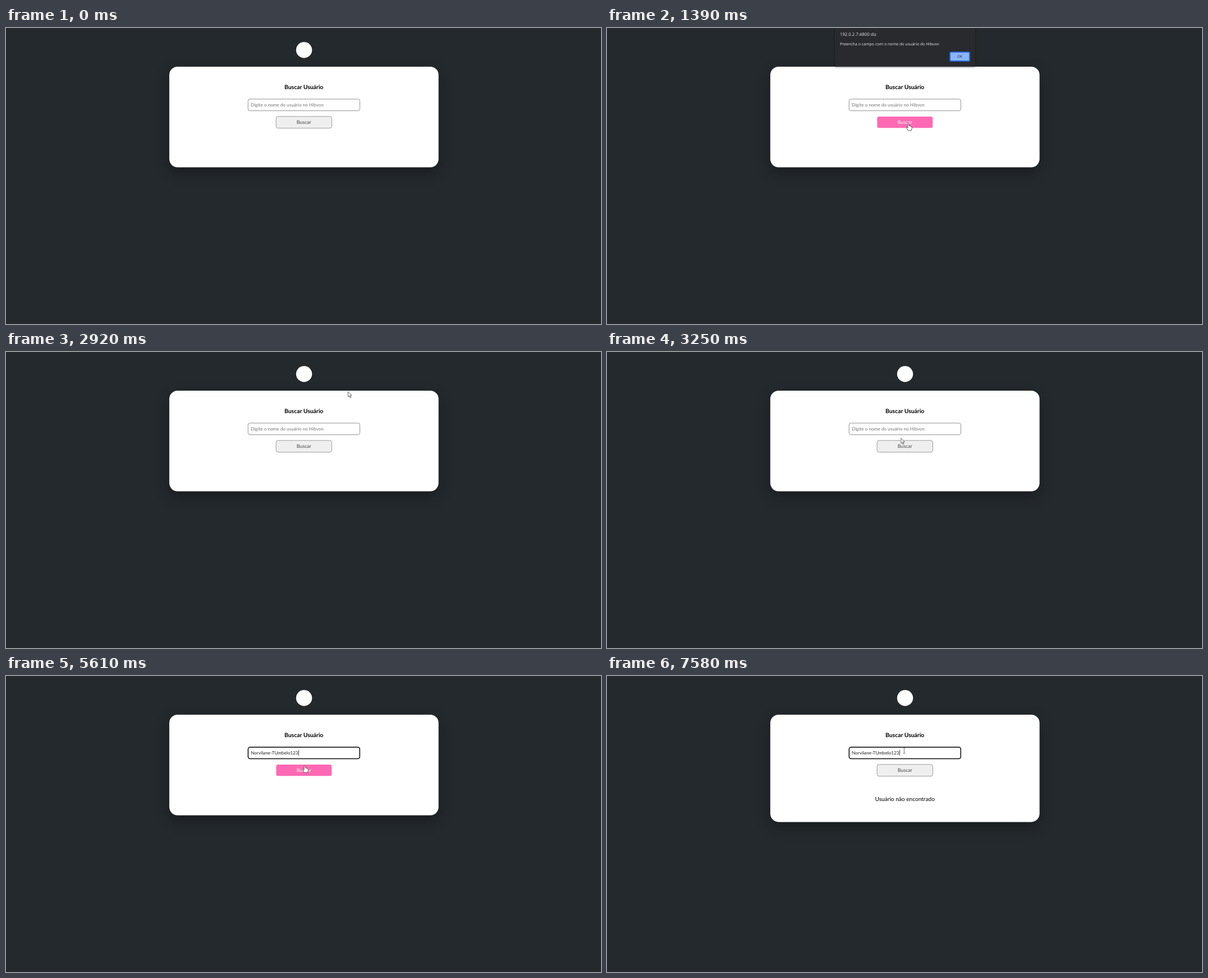
Write an HTML page that moves like this. It is 1060x528 px and loops after 8 s.

```html
<!DOCTYPE html>
<html lang="pt-BR">
<head>
<meta charset="utf-8">
<title>Buscar Usuário</title>
<style>
html, body { margin: 0; width: 100%; height: 100%; overflow: hidden; }
body {
  position: relative;
  background: #24292d;
  font: 8.2px/22px Lato, sans-serif;
  text-rendering: geometricPrecision;
  white-space: nowrap;
}
div, svg { position: absolute; box-sizing: border-box; }

/* Every animated part shares one 8 s clock and changes in hard steps. */
.a, .typo::after { animation: 8s step-end infinite; }

.shapes { left: 0; top: 0; width: 1060px; height: 528px; }
.card {
  fill: #fff;
  filter: drop-shadow(0 9px 11px rgba(0,0,0,.3));
  animation-name: grow;
}
.input { fill: #fff; stroke: #767676; stroke-width: .8; }
.ring { fill: none; stroke: #101010; stroke-width: 1.5; animation-name: ring; }
.button { fill: #efefef; stroke: #767676; stroke-width: .7; }
.hot { animation-name: hot; }

.line { left: 290.7px; width: 480px; text-align: center; color: #000; }
.title { top: 95px; font-size: 10.4px; font-weight: 700; }
.result { top: 209px; font-size: 10.15px; animation-name: result; }
.label { top: 157px; font-size: 8.75px; animation-name: label; }

.hint, .value { left: 436px; top: 126px; height: 22px; }
.hint { color: #757575; animation-name: hint; }
.value { color: #222; }
.name { animation-name: name; }
.d1 { animation-name: d1; }
.d2 { animation-name: d2; }
.d3 { animation-name: d3; }
.typo { position: relative; }
.typo::after {
  content: ""; position: absolute; left: 1px; right: 0; bottom: 0;
  border-bottom: 1px dotted #df7878; animation-name: typo;
}
.caret {
  display: inline-block; width: 1px; height: 10px; margin-right: -1px;
  vertical-align: -2px; background: #444; animation-name: caret;
}

.dialog {
  left: 406px; top: 0; width: 250px; height: 69px;
  background: #292a2d; color: #e8eaed; font-family: "Open Sans", sans-serif;
  box-shadow: 0 1px 3px rgba(0,0,0,.45); animation-name: dialog;
}
.host { left: 9px; top: 1px; font-size: 7.75px; }
.msg { left: 9px; top: 18px; font-size: 7.05px; }
.ok {
  left: 204px; top: 42px; width: 37px; height: 18px; line-height: 14px;
  border: 2px solid #2a68d4; border-radius: 3px; background: #8ab4f8; color: #202124;
  font-size: 6.4px; text-align: center; animation-name: ok;
}

.cursor { left: 0; top: 0; width: 1px; height: 1px; overflow: visible; animation-name: move; }
.cursor path { fill: #fff; stroke: #333; stroke-width: .8; stroke-linejoin: round; }
.arrow { animation-name: arrow; }
.hand { animation-name: hand; }
.beam { animation-name: beam; }

@keyframes grow { 0% { height: 179.7px } 76.44%, to { height: 191.6px } }
@keyframes result { 0% { opacity: 0 } 76.44%, to { opacity: 1 } }
@keyframes ring { 0%, 74.75% { opacity: 0 } 44%, 94%, to { opacity: 1 } }
@keyframes caret { 0%, 50.625%, 74.75% { opacity: 0 } 44%, 56.5%, 94%, to { opacity: 1 } }
@keyframes hint { 0% { opacity: 1 } 56.5%, to { opacity: 0 } }
@keyframes name { 0% { font-size: 0 } 56.5%, to { font-size: 8.2px } }
@keyframes d1 { 0% { font-size: 0 } 64%, to { font-size: 8.2px } }
@keyframes d2 { 0% { font-size: 0 } 65.625%, to { font-size: 8.2px } }
@keyframes d3 { 0% { font-size: 0 } 66.625%, to { font-size: 8.2px } }
@keyframes typo { 0%, 64%, to { opacity: 0 } 57.25% { opacity: 1 } }
@keyframes hot { 0%, 35.625%, 90.6%, to { opacity: 0 } 13.28%, 69.8% { opacity: 1 } }
@keyframes label { 0%, 35.625%, 90.6%, to { color: #444 } 13.28%, 69.8% { color: #fff } }
@keyframes dialog { 0%, 34.75%, to { opacity: 0 } 16.625% { opacity: 1 } }
@keyframes ok { 0% { background: #8ab4f8 } 29.78%, to { background: #84a8e6 } }
@keyframes arrow { 0%, 13.28%, 41.375%, 69.8%, to { opacity: 0 } 4.875%, 24%, 68.95% { opacity: 1 } }
@keyframes hand { 0%, 24%, 90.6%, to { opacity: 0 } 13.28%, 69.8% { opacity: 1 } }
@keyframes beam { 0%, 68.95% { opacity: 0 } 41.375%, 90.6%, to { opacity: 1 } }
@keyframes move {
  0% { translate: 985px 488px }
  4.875% { translate: 985px 488px; animation-timing-function: steps(3, end) }
  7.375% { translate: 709px 313px }
  9.125% { translate: 709px 313px; animation-timing-function: steps(6, start) }
  14.125% { translate: 537px 170px }
  24% { translate: 537px 170px; animation-timing-function: steps(6, start) }
  29% { translate: 630px 22px; animation-timing-function: steps(3, start) }
  31.375% { translate: 626.5px 54px }
  35.625% { translate: 626.5px 54px; animation-timing-function: steps(6, start) }
  41.3% { translate: 523.5px 153.5px }
  41.375% { translate: 528.5px 137px }
  68.125% { translate: 528.5px 137px; animation-timing-function: steps(5, start) }
  72.3% { translate: 534.5px 174.5px }
  89.75% { translate: 534.5px 174.5px; animation-timing-function: steps(3, start) }
  92.35%, to { translate: 529.5px 133px }
}
</style>
</head>
<body>
<svg class="shapes">
  <circle cx="531" cy="39.3" r="14.2" fill="#fff"/>
  <rect class="card a" x="290.9" y="68.9" width="479.7" height="179.7" rx="15"/>
  <rect class="input" x="431.2" y="126.8" width="199.2" height="20.8" rx="3.5"/>
  <rect class="ring a" x="431.4" y="126.9" width="198.8" height="20.6" rx="3.5"/>
  <rect class="button" x="481.1" y="157.8" width="99.3" height="20.9" rx="3.5"/>
  <g class="hot a">
    <rect x="480" y="156" width="102" height="24" fill="#fff"/>
    <rect x="481.3" y="158" width="98.9" height="20.3" rx="3" fill="#ff69b4"/>
  </g>
</svg>
<div class="line title">Buscar Usuário</div>
<div class="hint a">Digite o nome do usuário no Hibvon</div>
<div class="value"><span class="name a">Norvilane-<span class="typo">TUmbelo</span></span><span class="d1 a">1</span><span class="d2 a">2</span><span class="d3 a">3</span><span class="caret a"></span></div>
<div class="line label a">Buscar</div>
<div class="line result a">Usuário não encontrado</div>
<div class="dialog a">
  <div class="host">192.0.2.7:4800 diz</div>
  <div class="msg">Preencha o campo com o nome do usuário do Hibvon</div>
  <div class="ok a">OK</div>
</div>
<svg class="cursor a">
  <path class="arrow a" d="M0 0V9.5L2.2 7.5 3.7 11 5.2 10.3 3.8 7H6.8Z"/>
  <path class="hand a" d="M-1.2 1.2Q0-.6 1.1 1.2V4.6Q3.2 4.2 3.5 5.2 5 4.9 5.2 6 6.2 6 6.2 7.2V9.5L5 12.8H-.8L-3.4 8.4Q-3.4 6.9-2.2 7.4L-1.2 8.4Z"/>
  <path class="beam a" style="fill:none" d="M-1.7-5H-.4L0-4.6 .4-5H1.7M0-4.6V4.6M-1.7 5H-.4L0 4.6 .4 5H1.7"/>
</svg>
</body>
</html>
```
